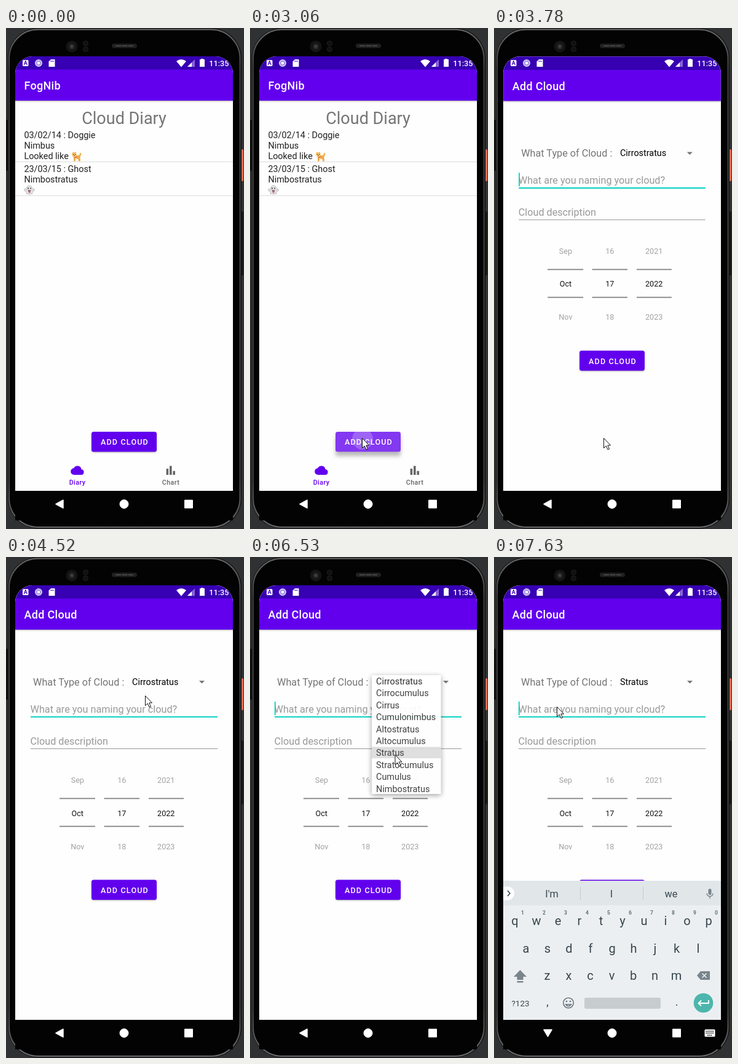
These frames come from a looping animation (387 by 814 pixels, 8000 ms). An HTML page:

```html
<!DOCTYPE html>
<html lang="en">
<meta charset="utf-8">
<title>Cloud diary</title>
<style>
  html, body { margin: 0; width: 100%; height: 100%; overflow: hidden; background: #2f3133; }
  svg { display: block; width: 387px; height: 814px; font-family: Roboto, sans-serif; }
  text { white-space: pre; }
  .medium { font-weight: 500; }
  .raised { filter: drop-shadow(0 1.5px 1px #0005); }
  .lifted { filter: drop-shadow(0 7px 3px #0004); }
  #popup > rect:first-child { filter: drop-shadow(0 2px 4px #0006); }
</style>
<svg viewBox="0 0 387 814">
  <defs>
    <clipPath id="screen"><path d="M15 800V74A28 28 0 0 1 43 46H341A28 28 0 0 1 369 74V800Z"/></clipPath>
    <clipPath id="list"><rect id="listClip" x="190" width="140"/></clipPath>
    <clipPath id="button"><rect x="139" y="656" width="106" height="32.5" rx="3.5"/></clipPath>
    <linearGradient id="metal" x2="0" y2="1">
      <stop stop-color="#6a6a6a"/><stop offset=".08" stop-color="#3c3c3c"/>
      <stop offset=".9" stop-color="#3c3c3c"/><stop offset="1" stop-color="#6a6a6a"/>
    </linearGradient>
  </defs>

  <!-- phone body -->
  <rect width="387" height="814" fill="#2f3133"/>
  <rect y="149" width="4" height="83" rx="2" fill="#111"/>
  <rect x="382" y="298" width="4" height="104" rx="2" fill="#161616"/>
  <rect x="381" y="197" width="5" height="52" rx="2" fill="#e5694f"/>
  <rect x="3" y=".5" width="380" height="812.500" rx="49" fill="#101010"/>
  <rect x="5" y="2.500" width="375.500" height="808.500" rx="47" fill="#030303" stroke="url(#metal)" stroke-width="2.200"/>
  <circle cx="107" cy="30" r="9.5" fill="#141414"/>
  <circle cx="107" cy="30" r="4.5" fill="#292929"/>
  <circle cx="107" cy="30" r="2" fill="#444"/>
  <g fill="#101010" stroke="#202020"><circle cx="129.500" cy="25" r="4"/><circle cx="129.500" cy="34.500" r="4"/></g>
  <rect x="172" y="25.500" width="41" height="7" rx="3.500" fill="#202020"/>
  <path d="M178 29H207" stroke="#454545" stroke-width="2" stroke-dasharray="9 1.500"/>

  <g clip-path="url(#screen)">
    <g id="diary">
      <rect x="15" y="46" width="354" height="706" fill="#fefefe"/>
      <path d="M15 217.500H369M15 272.500H369" stroke="#ddd"/>
      <g transform="translate(107 201)">
        <path d="M3 7V15.500H5.500L6.500 12H10.500L11 15.500H14L13.500 9 15.500 3 13.500 1.500 12 6H6Z" fill="#eeab48"/>
        <path d="M0 4 2 0 4 1.500 6.500 0 8 5 6 9H2Z" fill="#f6bc59"/>
        <path d="M2 6H6L5 8.500H3ZM5 9.500H9L6 13Z" fill="#fbe3b0"/>
        <path d="M2 4h1v1H2zM5 4h1v1H5zM3.500 6h1.500v1H3.500z" fill="#33231a"/>
        <path d="M4 9.200H8" stroke="#d94a38" stroke-width="1.300"/>
      </g>
      <g transform="translate(30 255)">
        <path d="M3 8C3 3 5 1 8 1S13 3 13 8L15.500 6 16.500 9 13 11.500 12.500 15 10 14 8 16 6 14 3.500 15 3 11.500 -.5 9 .5 6Z" fill="#e2e2e4" stroke="#b4b4b8" stroke-width=".8"/>
        <ellipse cx="6" cy="5.500" rx=".9" ry="1.300" fill="#444"/><circle cx="10" cy="5.500" r="1" fill="#444"/>
        <path d="M5.500 8.500H10.500Q10 11.500 8 11.500T5.500 8.500Z" fill="#555"/><path d="M6.800 9.500H9.500V12.500Q8 14 6.800 12.500Z" fill="#e8577b"/>
      </g>
      <rect id="diaryButton" x="139" y="656" width="106" height="32.500" rx="3.500"/>
      <g clip-path="url(#button)"><circle id="ripple" cx="183" cy="668" fill="#fff" opacity=".22"/></g>
      <path transform="translate(105.200 708) scale(.9)" fill="#6200ee"
        d="M19.350 10.040A7.490 7.490 0 0 0 12 4C9.110 4 6.600 5.640 5.350 8.040A6 6 0 0 0 6 20H19A5 5 0 0 0 19.350 10.040Z"/>
      <path transform="translate(257 708) scale(.9)" fill="#666" d="M4 9H8V20H4ZM10 4H14V20H10ZM16 13H20V20H16Z"/>
    </g>

    <g id="page">
      <rect x="15" y="46" width="354" height="706" fill="#fefefe"/>
      <circle id="arrowRipple" cx="318" cy="202.500" r="17.500" fill="#f0f0f0"/>
      <path d="M314 201H323L318.500 205.500Z" fill="#757575"/>
      <path d="M40 259.700H344" stroke="#03d0c0" stroke-width="2"/>
      <path d="M40 311.500H344" stroke="#999"/>
      <path id="caret" d="M40.800 235V257" stroke="#03d0c0" stroke-width="1.800"/>
      <path d="M87 392.300H145M159.500 392.300H217M232 392.300H289M87 437.700H145M159.500 437.700H217M232 437.700H289" stroke="#808080" stroke-width="1.800"/>
      <rect class="raised" x="139" y="524.500" width="106" height="32.500" rx="3.500" fill="#6200ee"/>
    </g>

    <g id="popup">
      <rect id="panel" x="198" y="192" width="112.500" fill="#fff"/>
      <rect id="choice" x="198" y="308.500" width="112.500" height="18.500" fill="#ddd"/>
      <g id="items" clip-path="url(#list)"></g>
    </g>

    <g id="status" fill="#fff">
      <rect x="27" y="52" width="9.500" height="10" rx="1.500"/>
      <circle cx="53" cy="57" r="5" fill="#9c8be0" stroke="#d5caf3" stroke-width="2"/><circle cx="53" cy="57" r="2.300"/>
      <path d="M73 51H79.500V63H69.500V54.500Z"/><path d="M73 53V55M75 53V55M77 53V55" stroke="#3700b3"/>
      <path d="M277 54Q285 48 293 54L285 63.500Z"/>
      <path d="M307 51V63H295Z" opacity=".4"/><path d="M302 56V63H295Z"/>
      <path d="M317 51V50H321V51H323V63H315V51Z"/>
    </g>

    <g id="keyboard">
      <rect x="15" y="526" width="354" height="230" fill="#eceff1"/>
      <rect x="15" y="526" width="354" height="40" fill="#e1e6e9"/>
      <path d="M140.500 536V557M242.500 536V557" stroke="#c3cacd"/>
      <path d="M15 535.500H22A11 11 0 0 1 22 557.500H15Z" fill="#fff"/>
      <path d="M22 542 26 546.500 22 551" fill="none" stroke="#37474f" stroke-width="1.600"/>
      <rect x="348.500" y="539" width="5" height="10" rx="2.500" fill="#78858b"/>
      <path d="M346 546.500A5 5 0 0 0 356 546.500M351 552V555" fill="none" stroke="#78858b" stroke-width="1.400"/>
      <path d="M42.500 671 53 682H47.500V687H37.500V682H32ZM37.500 689H47.500V691.500H37.500Z" fill="#78858b"/>
      <path d="M336 673H351V687H336L330 680Z" fill="#78858b"/>
      <path d="M338.500 676.500 345.500 683.500M345.500 676.500 338.500 683.500" stroke="#eceff1" stroke-width="1.600"/>
      <g fill="none" stroke="#66747a" stroke-width="1.500"><circle cx="121" cy="724.500" r="8.300"/><path d="M116.500 727Q121 732.500 125.500 727Z"/></g>
      <circle cx="118" cy="722" r="1.300" fill="#66747a"/><circle cx="124" cy="722" r="1.300" fill="#66747a"/>
      <rect x="147" y="716" width="124" height="18" rx="3" fill="#c7cccf"/>
      <circle cx="340.500" cy="724.500" r="15.800" fill="#4db6ac"/>
      <path d="M349 720V725H333M337 720.500 332.500 725 337 729.500" fill="none" stroke="#fff" stroke-width="1.800"/>
    </g>

    <rect x="15" y="752" width="354" height="50" fill="#030303"/>
    <g fill="#fff" stroke="#fff" stroke-linejoin="round">
      <path id="back" stroke-width="1.500"/>
      <circle cx="192" cy="773.500" r="7"/>
      <rect x="290.500" y="767" width="13" height="13"/>
    </g>
    <g id="switcher"><rect x="342.500" y="767.500" width="17" height="12" rx="1.500" fill="#fff"/>
      <path d="M344.500 770.500H358M344.500 773.500H358M347 777H355" stroke="#000" stroke-width="1.600" stroke-dasharray="1.700 1"/></g>
  </g>
  <path id="cursor" d="M.5 .5V16.500L4.200 13 7 19 9.500 18 6.800 12H11.500Z" fill="#fff" stroke="#111" stroke-linejoin="round"/>
</svg>
<script>
const $ = id => document.getElementById(id);

function add(parent, name, attrs, content = '') {
  const el = document.createElementNS('http://www.w3.org/2000/svg', name);
  for (const key in attrs) el.setAttribute(key, attrs[key]);
  el.textContent = content;
  return $(parent).appendChild(el);
}
const text = (parent, x, y, size, fill, content, more) =>
  add(parent, 'text', { x, y, 'font-size': size, fill, ...more }, content);
const medium = spacing => ({ class: 'medium', 'letter-spacing': spacing });
const centred = { 'text-anchor': 'middle' };
const sp = size => size * .9013;

function appBar(parent, title) {
  add(parent, 'rect', { x: 15, y: 67, width: 354, height: 51, fill: '#6200ee', class: 'raised' });
  add(parent, 'rect', { x: 15, y: 46, width: 354, height: 21.5, fill: '#3700b3' });
  text(parent, 29.4, 100, sp(20), '#fff', title, medium(.3));
}

// Diary screen
appBar('diary', 'FogNib');
text('diary', 192, 156, sp(30), '#757575', 'Cloud Diary', centred);
['03/02/14 : Doggie', 'Nimbus', 'Looked like', '23/03/15 : Ghost', 'Nimbostratus'].forEach((line, i) =>
  text('diary', 29.4, 179 + i * 17.2 + (i > 2 ? 3.3 : 0), sp(16), '#212121', line));
text('diary', 154, 677, sp(14), '#fff', 'ADD CLOUD', medium(1.12));
text('diary', 116, 742, sp(12), '#6200ee', 'Diary', { ...medium(.36), ...centred });
text('diary', 268, 742, sp(12), '#666', 'Chart', { ...medium(.36), ...centred });

// Form screen
appBar('page', 'Add Cloud');
text('page', 44, 208.5, sp(18), '#757575', 'What Type of Cloud :');
const chosen = text('page', 205, 208, sp(16), '#000');
text('page', 39.5, 252.5, sp(18), '#999', 'What are you naming your cloud?');
text('page', 39.5, 305, sp(18), '#999', 'Cloud description');
[['Sep', 'Oct', 'Nov'], [16, 17, 18], [2021, 2022, 2023]].forEach((column, c) =>
  column.forEach((value, r) =>
    text('page', 116.3 + c * 72, 366.5 + r * 54, sp(14), r === 1 ? '#111' : '#a3a3a3', value, centred)));
text('page', 154, 546, sp(14), '#fff', 'ADD CLOUD', medium(1.12));

const types = 'Cirrostratus Cirrocumulus Cirrus Cumulonimbus Altostratus Altocumulus Stratus Stratocumulus Cumulus Nimbostratus';
types.split(' ').forEach((type, i) => text('items', 205, 207 + i * 19.4, sp(16), '#333', type));

text('status', 31.8, 60.3, 9, '#3700b3', 'A', { ...centred, 'font-weight': 700 });
text('status', 330.3, 61.8, sp(14), '#fff', '11:35', medium(0));

// Keyboard
const key = (x, y, size, label) => text('keyboard', x, y, size, '#37474f', label, centred);
["I'm", 'I', 'we'].forEach((word, i) => key(94 + i * 97, 553, sp(18), word));
[['qwertyuiop', 34, 598], ['asdfghjkl', 52, 643], ['zxcvbnm', 86.5, 687]].forEach(([row, x, y]) =>
  [...row].forEach((letter, i) => key(x + i * 35, y, 20, letter)));
[...'1234567890'].forEach((digit, i) =>
  text('keyboard', 46.5 + i * 35, 581, 8.5, '#66747a', digit, { ...centred, 'font-weight': 700 }));
key(43, 729.5, 13.5, '?123');
key(87, 729, 18, ',');
key(297, 729, 18, '.');

const spans = [[1050, 1650], [2670, 2790], [3060, 3780], [3900, 4140], [4280, 4880],
  [5120, 5240], [5380, 5620], [5800, 6280], [6530, 7010], [7270, 7630]];
const pointer = [[1050, 1, 767], [1170, 55, 742], [1290, 145, 707], [1410, 208, 682], [1530, 217, 672],
  [1650, 203, 670], [2670, 192, 668], [2790, 182, 666], [3420, 182, 666], [3540, 178, 666],
  [3780, 178, 666], [3900, 184, 600], [4020, 203, 480], [4140, 212, 385], [4280, 217, 330],
  [4400, 222, 270], [4520, 226, 225], [4880, 229, 200], [5120, 230, 203], [5240, 232, 228],
  [5380, 237, 290], [5500, 239, 335], [5620, 239, 345], [5800, 238, 342], [6280, 235.5, 321],
  [6650, 235.5, 321], [6770, 195, 298], [6890, 130, 258], [7010, 102, 243]];

function stepped(t) {
  const span = spans.findLast(([start]) => t >= start);
  return span ? Math.min(span[1], span[0] + Math.floor((t - span[0]) / 120) * 120) : 0;
}

function pointerAt(t) {
  const i = pointer.findLastIndex(([time]) => t >= time);
  const [t0, x0, y0] = pointer[i], [t1, x1, y1] = pointer[i + 1] || [t0 + 1, x0, y0];
  const k = Math.min(1, (t - t0) / (t1 - t0));
  return [x0 + (x1 - x0) * k, y0 + (y1 - y0) * k];
}

const clamp = v => Math.max(0, Math.min(1, v));
const set = (id, name, value) => $(id).setAttribute(name, value);
const show = (id, on) => set(id, 'display', on ? 'inline' : 'none');

function draw(now) {
  const t = stepped(now % 8000);

  show('cursor', t >= 1050);
  if (t >= 1050) set('cursor', 'transform', `translate(${pointerAt(t)})`);

  const pressed = t >= 3060;
  set('diaryButton', 'fill', pressed ? '#8338f1' : '#6200ee');
  set('diaryButton', 'class', pressed ? 'lifted' : 'raised');
  set('ripple', 'r', pressed ? 17 + (t - 3060) * .2 : 0);

  const open = clamp((t - 3380) / 450);
  const scale = .85 + .15 * (1 - (1 - open) ** 2);
  show('page', open > 0);
  set('page', 'opacity', clamp(open * 4));
  set('page', 'transform', `translate(192 410) scale(${scale}) translate(-192 -410)`);
  show('caret', t < 4280 || t >= 4760 && t < 5240 || t >= 6530);
  chosen.textContent = t < 6650 ? 'Cirrostratus' : 'Stratus';

  const growing = t < 5380;
  show('arrowRipple', t >= 5120 && growing);
  show('popup', t >= 5120 && t < 6770);
  show('choice', t >= 6530);
  set('popup', 'opacity', t < 5240 ? .4 : t < 6530 ? 1 : t < 6650 ? .93 : .3);
  set('popup', 'transform', `translate(${growing ? 1 : 0} 0)`);
  set('panel', 'height', growing ? 185 : 193);
  set('listClip', 'y', growing ? 196 : 190);
  set('listClip', 'height', growing ? 185.5 : 195);
  set('items', 'transform', `translate(0 ${growing ? -4 : 0})`);

  const typing = t >= 7270;
  show('keyboard', typing);
  show('switcher', typing);
  set('keyboard', 'transform', `translate(0 ${226 * (1 - clamp((t - 7200) / 430)) ** 3})`);
  set('back', 'd', typing ? 'M81 768H94L87.5 779Z' : 'M81 773.5 93 767V780Z');

  requestAnimationFrame(() => draw(performance.now()));
}
draw(performance.now());
</script>
</html>
```
